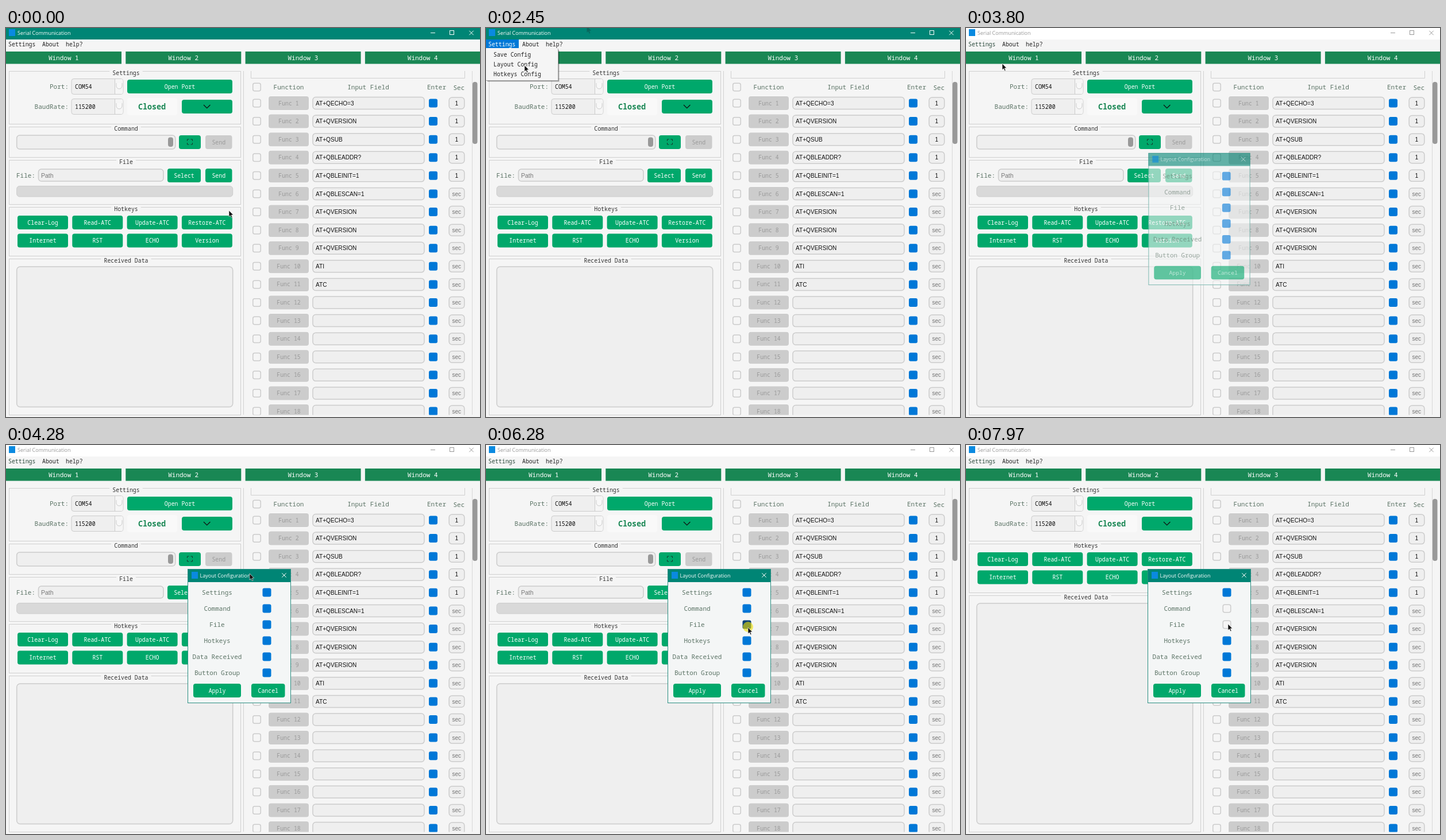
These frames come from a looping animation (825x678 px, 8 s). An HTML page with a canvas:

```html
<!DOCTYPE html>
<html lang="en">
<head>
<meta charset="utf-8">
<title>Serial Communication</title>
<style>
  html, body { margin: 0; width: 100%; height: 100%; overflow: hidden; background: #f5f5f5; }
  canvas { display: block; }
</style>
</head>
<body>
<canvas id="stage" width="825" height="678"></canvas>
<script>
const ctx = document.getElementById('stage').getContext('2d');
const LOOP = 8000, STEP = 70;
const MONO = '"Noto Sans Mono", "DejaVu Sans Mono", monospace';
const UI = '"Open Sans", "Noto Sans", sans-serif';
const SANS = '"Liberation Sans", Arial, sans-serif';
const TEAL = '#008575', GREEN = '#00a86b', TAB = '#198754', BLUE = '#0078d7';
const PAGE = '#f5f5f5', LINE = '#cccccc', FIELD = '#efefef', LABEL = '#5b7365', MUTED = '#9a9a9a';

// Moments when the interface changes
const HOVER_MENU = 1420, OPEN_MENU = 1830, OPEN_DIALOG = 3730, HIDE_FILE = 6350, HIDE_COMMAND = 7570;
const CLICKS = [[1760, 1900], [3590, 3730], [6280, 6350], [7440, 7570]];

// Pointer tip: time, x, y
const POINTER = [
  [0, 388, 318], [310, 388, 318], [520, 239, 1], [590, 239, -50], [720, 176, -50],
  [790, 176, -3], [1280, 70, 20], [1560, 43, 21], [2030, 43, 21], [2450, 67, 65],
  [2650, 67, 65], [2860, 63, 62], [3800, 63, 62], [4280, 424, 224], [4490, 475, 277],
  [5050, 452, 283], [5460, 452, 283], [5880, 460, 325], [6280, 456, 318],
  [6550, 456, 318], [7040, 452, 283], [7830, 452, 283], [7970, 456, 312], [LOOP, 456, 312]
];

function pointerAt(t) {
  const next = POINTER.findIndex(key => key[0] > t);
  const [t0, x0, y0] = POINTER[next - 1], [t1, x1, y1] = POINTER[next];
  const k = Math.floor((t - t0) / STEP) * STEP / (t1 - t0);
  return [x0 + (x1 - x0) * k, y0 + (y1 - y0) * k];
}

function rect(x, y, w, h, fill) {
  ctx.fillStyle = fill;
  ctx.fillRect(x, y, w, h);
}

function box(x, y, w, h, r, fill, stroke, width = 1.5) {
  ctx.beginPath();
  ctx.roundRect(x, y, w, h, r);
  if (fill) { ctx.fillStyle = fill; ctx.fill(); }
  if (stroke) { ctx.strokeStyle = stroke; ctx.lineWidth = width; ctx.stroke(); }
}

function path(points, stroke, width = 1) {
  ctx.beginPath();
  points.forEach(([x, y]) => ctx.lineTo(x, y));
  ctx.strokeStyle = stroke;
  ctx.lineWidth = width;
  ctx.stroke();
}

// y is the middle of the capitals
function text(str, x, y, color, { size = 9.9, font = MONO, align = 'left', weight = '' } = {}) {
  ctx.font = `${weight} ${size}px ${font}`;
  ctx.textAlign = align;
  ctx.fillStyle = color;
  ctx.fillText(str, x, y + size * 0.36);
}

function button(str, x, y, w, h = 24, enabled = true) {
  box(x, y, w, h, 4, enabled ? GREEN : LINE);
  text(str, x + w / 2, y + h / 2, enabled ? '#fff' : MUTED, { align: 'center' });
}

function field(x, y, w, h, r = 5) { box(x, y, w, h, r, FIELD, LINE); }

function checkbox(x, y, checked, hover) {
  if (checked) box(x, y, 15, 15, 3, hover ? '#0b4278' : BLUE);
  else box(x + 0.75, y + 0.75, 13.5, 13.5, 3, PAGE, LINE);
}

function cross(x, y, r, color) {
  path([[x - r, y - r], [x + r, y + r]], color);
  path([[x - r, y + r], [x + r, y - r]], color);
}

function group(title, y, h) {
  ctx.strokeStyle = '#d0d0d0';
  ctx.lineWidth = 1;
  ctx.strokeRect(5.5, y + 0.5, 403, h);
  const w = title.length * 5.94 + 10;
  rect(209 - w / 2, y - 2, w, 8, PAGE);
  text(title, 209, y + 3, '#333', { align: 'center' });
}

function titleBar(active) {
  const ink = active ? '#fff' : '#999';
  rect(0, 0, 825, 20, active ? TEAL : '#fff');
  rect(5, 2, 11, 12, '#0a8ae0');
  text('Serial Communication', 20, 8.5, ink, { size: 9, font: UI });
  path([[739, 8.5], [747, 8.5]], ink);
  ctx.strokeRect(772.5, 4.5, 7, 7);
  cross(810, 8.5, 3.7, ink);
}

function menuBar(t) {
  const lit = t >= HOVER_MENU && t < OPEN_DIALOG;
  if (lit) rect(0, 20, 57, 15, BLUE);
  text('Settings', 4, 28, lit ? '#fff' : t >= OPEN_DIALOG ? '#2b4a3c' : '#222');
  text('About', 63, 28, '#222');
  text('help?', 104, 28, '#222');
}

function combo(label, value, y) {
  text(label, 109, y, LABEL, { size: 11, align: 'right' });
  box(114, y - 13.5, 90, 27, 4, FIELD, LINE, 1);
  box(189, y - 13, 14.5, 26, 3, PAGE);
  path([[189.5, y - 13], [189.5, y + 13]], LINE);
  box(192, y - 6, 10, 10, [0, 0, 5, 5], '#f8f8f8');
  ctx.beginPath();
  ctx.moveTo(192, y - 6);
  ctx.arc(197, y - 1, 5, Math.PI, 0, true);
  ctx.lineTo(202, y - 6);
  ctx.strokeStyle = LINE;
  ctx.stroke();
  text(value, 120, y, '#111');
}

function settingsGroup() {
  group('Settings', 75, 92);
  combo('Port:', 'COM54', 102);
  combo('BaudRate:', '115200', 137);
  button('Open Port', 211, 90, 183);
  box(211, 122, 87, 30, 4, '#f9f9f9');
  text('Closed', 254, 137, TAB, { size: 13.4, align: 'center', weight: 'bold' });
  button('', 306, 125, 88);
  path([[344, 134], [349.7, 139.7], [355.4, 134]], '#111', 1.3);
}

function commandGroup() {
  group('Command', 172, 53);
  field(18.7, 187, 276, 24);
  box(282, 190.5, 9, 16.5, 4, '#999');
  button('', 301, 187, 38);
  for (const sx of [-1, 1]) for (const sy of [-1, 1]) {
    const x = 320 + sx * 4.5, y = 198.5 + sy * 4.5;
    path([[x - sx * 3, y], [x, y], [x, y - sy * 3]], '#123c2c');
  }
  button('Send', 347, 187, 46.5, 24, false);
}

function fileGroup() {
  group('File', 230, 77);
  text('File:', 18, 257, LABEL, { size: 11 });
  field(56.5, 246, 217.5, 21);
  text('Path', 61, 257, '#777', { size: 10.5, font: SANS });
  button('Select', 281, 245, 58);
  button('Send', 347, 245, 46.5);
  box(18.7, 275.5, 376, 18.5, 5, '#d9d9d9', LINE, 1);
}

function hotkeysGroup(y) {
  group('Hotkeys', y, 85);
  ['Clear-Log', 'Read-ATC', 'Update-ATC', 'Restore-ATC', 'Internet', 'RST', 'ECHO', 'Version']
    .forEach((name, i) => button(name, 20 + (i % 4) * 95.3, y + 15 + Math.floor(i / 4) * 31.5, 88));
}

function receivedGroup(y) {
  group('Received Data', y, 674 - y);
  field(18.7, y + 14, 376, 660.5 - y - 14, 6);
}

function functionTable() {
  const head = { size: 11, align: 'center' }, cell = { size: 10.1, font: SANS };
  path([[413.5, 75], [413.5, 674]], '#d0d0d0');
  path([[811.5, 75], [811.5, 674]], '#d8d8d8');
  box(812, 94, 8.5, 108, 4, '#999');
  path([[426.5, 75], [426.5, 87.5], [798.5, 87.5], [798.5, 75]], '#d0d0d0');
  checkbox(429, 95.5);
  text('Function', 492, 103, LABEL, head);
  text('Input Field', 630.5, 103, LABEL, head);
  text('Enter', 749.5, 103, LABEL, head);

  ctx.save();
  ctx.beginPath();
  ctx.rect(414, 75, 385, 599.5);
  ctx.clip();
  text('Sec', 778.5, 104, LABEL, { size: 11 });
  const inputs = ['ECHO=3', 'VERSION', 'SUB', 'BLEADDR?', 'BLEINIT=1', 'BLESCAN=1', 'VERSION', 'VERSION', 'VERSION']
    .map(name => 'AT+Q' + name).concat('ATI', 'ATC');
  for (let i = 0; i < 18; i++) {
    const y = 131 + i * 31.59;
    checkbox(429, y - 7.5);
    box(456, y - 13, 72, 26, 5, '#fafafa');
    button('Func ' + (i + 1), 457, y - 12, 70, 24, false);
    field(534, y - 10.5, 194, 21);
    text(inputs[i] || '', 539, y, '#111', cell);
    checkbox(736, y - 7.5, true);
    field(771.2, y - 10, 26.6, 20);
    text(i < 5 ? '1' : 'sec', 784.3, y, i < 5 ? '#111' : '#777', { ...cell, align: 'center' });
  }
  ctx.restore();
}

function dropDown() {
  rect(3, 39, 125, 55, 'rgba(0,0,0,.12)');
  rect(2, 38, 125, 55, 'rgba(0,0,0,.3)');
  rect(0, 36, 126, 56, '#a8a8a8');
  rect(0, 36, 125, 55, '#f5f5f5');
  ['Save Config', 'Layout Config', 'Hotkeys Config']
    .forEach((item, i) => text(item, 13, 46 + i * 17, '#222'));
}

function dialog(t, px, py) {
  const shown = Math.min(1, (t - 3660) / 233), scale = 0.96 + 0.04 * shown;
  ctx.save();
  ctx.globalAlpha = shown;
  ctx.translate(405.5, 333);
  ctx.scale(scale, scale);
  ctx.translate(-405.5, -333);
  rect(316, 239, 180, 211, '#f4f6f6');
  rect(316, 216, 180, 23, TEAL);
  ctx.strokeStyle = '#2b8f82';
  ctx.lineWidth = 1;
  ctx.strokeRect(316.5, 216.5, 179, 233);
  rect(323, 221, 11, 12, '#0a8ae0');
  text('Layout Configuration', 337.5, 227.5, '#fff', { size: 9, font: UI });
  cross(484, 227, 3.7, '#fff');
  ['Settings', 'Command', 'File', 'Hotkeys', 'Data Received', 'Button Group'].forEach((name, i) => {
    const y = 257 + i * 28;
    const hidden = name === 'File' && t >= HIDE_FILE || name === 'Command' && t >= HIDE_COMMAND;
    const hover = px >= 447 && px < 462 && Math.abs(py - y) < 7.5;
    text(name, 367.5, y, LABEL, { size: 11, align: 'center' });
    checkbox(446.5, y - 7.5, !hidden, hover);
  });
  button('Apply', 326, 416, 83);
  button('Cancel', 427, 416, 58.5);
  ctx.restore();
}

function arrow(x, y, fill, outline) {
  const shape = [[0, 0], [0, 11], [2.5, 8.7], [4.3, 12.7], [6, 12], [4.3, 8], [7.6, 7.8]];
  ctx.beginPath();
  shape.forEach(([dx, dy]) => ctx.lineTo(x + dx, y + dy));
  ctx.closePath();
  ctx.fillStyle = fill;
  ctx.fill();
  if (!outline) return;
  ctx.strokeStyle = outline;
  ctx.lineWidth = 0.6;
  ctx.stroke();
}

function draw(t) {
  const [px, py] = pointerAt(t);
  const active = t < OPEN_DIALOG;
  rect(0, 0, 825, 678, PAGE);
  titleBar(active);
  // faint mark left by the pointer on the title bar
  if (t >= 790 && active) arrow(175.5, -3, 'rgba(20,60,60,.4)');
  menuBar(t);
  for (let i = 0; i < 4; i++) {
    const x = i * 208.3;
    rect(x, 41, 201, 21.5, TAB);
    text('Window ' + (i + 1), x + 100.3, 52, '#fff', { size: 11, align: 'center' });
  }
  settingsGroup();
  let shift = 0;
  if (t < HIDE_COMMAND) commandGroup(); else shift += 58;
  if (t < HIDE_FILE) fileGroup(); else shift += 82;
  hotkeysGroup(312 - shift);
  receivedGroup(402 - shift);
  functionTable();
  if (t >= OPEN_MENU && active) dropDown();
  if (!active) dialog(t, px, py);
  if (CLICKS.some(([from, to]) => t >= from && t < to)) {
    ctx.beginPath();
    ctx.arc(px, py - 1, 9, 0, 7);
    ctx.fillStyle = 'rgba(240,225,0,.6)';
    ctx.fill();
  }
  arrow(px, py, '#111', '#fff');
}

function frame() {
  draw(performance.now() % LOOP);
  requestAnimationFrame(frame);
}
frame();
</script>
</body>
</html>
```
